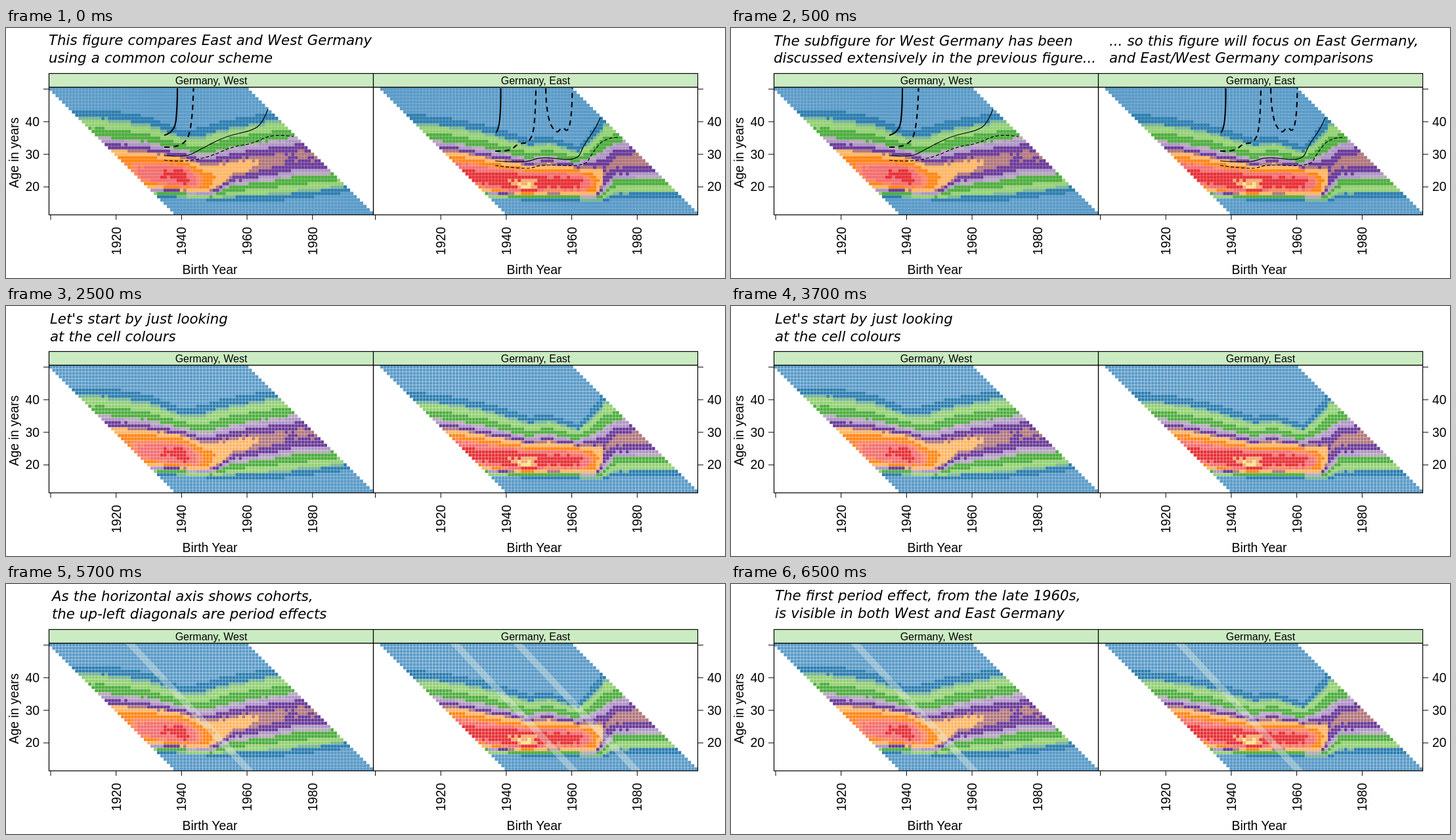
These frames come from a looping animation (1095x382 px, 8000 ms). An HTML page with a canvas:

```html
<!DOCTYPE html>
<html lang="en">
<head>
<meta charset="utf-8">
<title>Fertility by birth year and age</title>
<style>
  html, body { margin: 0; width: 100%; height: 100%; overflow: hidden; background: #fff; }
  canvas, svg { position: absolute; left: 0; top: 0; width: 1095px; height: 382px; }
  text { font-family: "Liberation Sans", Arial, sans-serif; font-size: 19.4px; fill: #000; }
  .strip { font-size: 16px; }
  .note { font: italic 21.3px Verdana, "DejaVu Sans", sans-serif; word-spacing: .4px; white-space: pre; }
</style>
</head>
<body>
<canvas id="map" width="1095" height="382"></canvas>
<svg id="art" viewBox="0 0 1095 382"></svg>
<script>
const LOOP = 8000;
const STEPS = [
  { at: 0, curves: true, notes: [[65, 26, "This figure compares East and West Germany", "using a common colour scheme"]] },
  { at: 500, curves: true, notes: [
    [65, 26.5, "The subfigure for West Germany has been", "discussed extensively in the previous figure..."],
    [576, 26.5, "... so this figure will focus on East Germany,", "and East/West Germany comparisons"]] },
  { at: 2500, notes: [[67, 27, "Let's start by just looking", "at the cell colours"]] },
  { at: 4500, stripes: 3, notes: [[70, 26, "As the horizontal axis shows cohorts,", "the up-left diagonals are period effects"]] },
  { at: 6500, stripes: 2, notes: [[67, 25, "The first period effect, from the late 1960s,", "is visible in both West and East Germany"]] }
];

// Lowest fertility rate that gets each colour.
const SCALE = [
  [0, "#5b9bc8"], [7, "#2d7eb0"], [13.5, "#79b594"], [16.5, "#95d074"], [26, "#4fae40"],
  [41, "#b7a9b9"], [45.5, "#af95c6"], [53, "#6b3c99"], [63, "#b2787c"], [67, "#fdb766"],
  [78, "#ff8717"], [90, "#fb8860"], [95, "#f37072"], [104, "#e73238"], [117, "#f6a870"], [120, "#fae488"]
];

// Age profile at a few birth years: year, peak rate, peak age, spread above, spread below, steepness below.
const WEST = [
  [1915, 80, 28, 9.4, 6.5, 4], [1930, 100, 25, 9.4, 6.3, 4], [1940, 110, 24, 7.4, 5.9, 4],
  [1946.5, 91, 21.8, 9.4, 4.4, 4], [1950.5, 76, 23.5, 9.8, 6.4, 4], [1955, 71, 25.8, 9.1, 7.1, 2.3],
  [1965, 67, 28, 9, 8.7, 2.3], [1975, 63.5, 30, 9, 9.8, 2.3], [1990, 67, 31, 9, 9, 2.3]
];
const EAST = [
  [1908, 95, 27, 9, 6, 4], [1925, 106, 25, 8.8, 5.5, 4], [1935, 110, 23, 8.7, 5.2, 4],
  [1947, 122, 21, 7.4, 3.9, 4], [1953, 108, 22, 7.6, 4.7, 4], [1962, 109, 22, 5.7, 5, 4],
  [1967, 86, 21, 10, 4.4, 4], [1970, 62, 25, 11, 8, 4], [1973, 65, 28, 9, 8.3, 2.3], [1985, 66, 29.2, 9, 9, 2.3]
];

const UNIT = 4.985, LAST = 2010;
const PANELS = [
  { left: 65.5, origin: 68, first: 1950, name: "Germany, West", profile: WEST },
  { left: 559.5, origin: 562.5, first: 1952, name: "Germany, East", profile: EAST }
];
const PANEL_W = 494;
const yearX = (panel, year) => panel.origin + (year - 1900) * UNIT;
const ageY = age => 93.3 + (50 - age) * UNIT;

// key points, line width, dash
const THICK = 2.1, THIN = 1.2;
const CURVES = [
  ["241,164 257,160 261,120 261,92", THICK],
  ["241,182 268,183 284,155 285.5,92", THICK, "8 6"],
  ["241,195 273,198 295,186 335,165 375,157 391,145 399,124", THIN],
  ["241,202 270,205 310,197 345,181 375,177 408,161 438,166", THIN, "5 3"],
  ["746,160 754,154 753.5,92", THICK],
  ["745,188 767,189 780,176 797,176 806,150 807,92", THICK, "8 6"],
  ["822,92 823,135 838,163 847,150 856,160 862,130 862.5,92", THICK, "8 6"],
  ["745,203 790,207 815,196 870,204 880,178 898,154 905,137", THIN],
  ["745,210 795,217 815,208 882,212 892,192 912,167 935,167", THIN, "5 3"]
];

const art = document.getElementById("art");
const ctx = document.getElementById("map").getContext("2d");

function add(parent, tag, attrs, text) {
  const el = document.createElementNS("http://www.w3.org/2000/svg", tag);
  for (const key in attrs) el.setAttribute(key, attrs[key]);
  if (text) el.textContent = text;
  parent.appendChild(el);
  return el;
}
const line = (x1, y1, x2, y2) => add(art, "line", { x1, y1, x2, y2, stroke: "#000" });
const label = (x, y, text, anchor, turn) => add(art, "text", {
  x, y, "text-anchor": anchor, transform: turn ? `rotate(-90 ${x} ${y})` : ""
}, text);

function smooth(points) {
  const p = points.split(" ").map(s => s.split(",").map(Number));
  let d = `M${p[0]}`;
  for (let i = 1; i < p.length - 1; i++) {
    const end = i === p.length - 2 ? p[i + 1] : [(p[i][0] + p[i + 1][0]) / 2, (p[i][1] + p[i + 1][1]) / 2];
    d += `Q${p[i]} ${end}`;
  }
  return d;
}

function profileAt(keys, year) {
  const next = keys.findIndex(k => k[0] > year);
  if (next === 0) return keys[0];
  if (next < 0) return keys[keys.length - 1];
  const a = keys[next - 1], b = keys[next], f = (year - a[0]) / (b[0] - a[0]);
  return a.map((v, i) => v + (b[i] - v) * f);
}

// Two-sided bell around the peak age.
function rate(keys, year, age) {
  const [, peak, mode, above, below, steep] = profileAt(keys, year);
  const d = age - mode;
  return peak * Math.exp(-(d > 0 ? (d / above) ** 1.7 : (-d / below) ** steep));
}

let seed = 7;
const noise = () => {
  seed = (seed * 16807) % 2147483647;
  return 1 + (seed / 2147483647 - 0.5) * 0.045;
};
const colorOf = value => SCALE.filter(s => s[0] <= value).pop()[1];

const cells = [];
for (const panel of PANELS)
  for (let age = 12; age <= 50; age++)
    for (let year = panel.first - age; year <= LAST - age; year++)
      cells.push({
        x: yearX(panel, year - 0.5), y: ageY(age + 0.5),
        color: colorOf(rate(panel.profile, year, age) * noise())
      });

function paint(step) {
  const size = UNIT - (step.curves ? 0 : 0.3);
  ctx.clearRect(0, 0, 1095, 382);
  for (const c of cells) {
    ctx.fillStyle = c.color;
    ctx.fillRect(c.x, c.y, size, size);
  }
  ctx.fillStyle = "rgba(228,240,225,.38)";
  for (const x of [182, 676.5, 772].slice(0, step.stripes || 0))
    ctx.fill(new Path2D(`M${x},91h14L${x + 195},285h-14Z`));
}

const curves = add(art, "g", { fill: "none", stroke: "#000", "stroke-linejoin": "round" });
for (const [pts, width, dash] of CURVES)
  add(curves, "path", { d: smooth(pts), "stroke-width": width, "stroke-dasharray": dash || "none" });

for (const p of PANELS) {
  const mid = p.left + PANEL_W / 2;
  const box = { x: p.left, width: PANEL_W, stroke: "#000", "stroke-width": 1.2 };
  add(art, "rect", { ...box, y: 69.5, height: 21, fill: "#cbebc3" });
  add(art, "rect", { ...box, y: 90.5, height: 195, fill: "none" });
  add(art, "text", { class: "strip", x: mid, y: 86, "text-anchor": "middle" }, p.name);
  for (let year = 1900; year <= 1980; year += 20) {
    const x = yearX(p, year);
    line(x, 285.5, x, 293);
    if (year > 1900) label(x + 7, 347, year, "start", true);
  }
  label(mid - 2, 376, "Birth Year", "middle");
}
for (let age = 20; age <= 50; age += 10) {
  const y = ageY(age);
  line(57, y, 65, y);
  line(1054, y, 1062, y);
  if (age < 50) {
    label(51, y + 6.5, age, "end");
    label(1068, y + 6.5, age, "start");
  }
}
label(19, 190.5, "Age in years", "middle", true);

const noteGroups = STEPS.map(step => {
  const g = add(art, "g", {});
  for (const [x, y, ...rows] of step.notes)
    rows.forEach((row, i) => add(g, "text", { class: "note", x, y: y + i * 26.5 }, row));
  return g;
});

let shown = -1;
const start = performance.now();
function tick(now) {
  const t = Math.max(0, now - start) % LOOP;
  const index = STEPS.filter(s => s.at <= t).length - 1;
  if (index !== shown) {
    shown = index;
    paint(STEPS[index]);
    curves.style.display = STEPS[index].curves ? "" : "none";
    noteGroups.forEach((g, i) => { g.style.display = i === index ? "" : "none"; });
  }
  requestAnimationFrame(tick);
}
tick(start);
</script>
</body>
</html>
```
